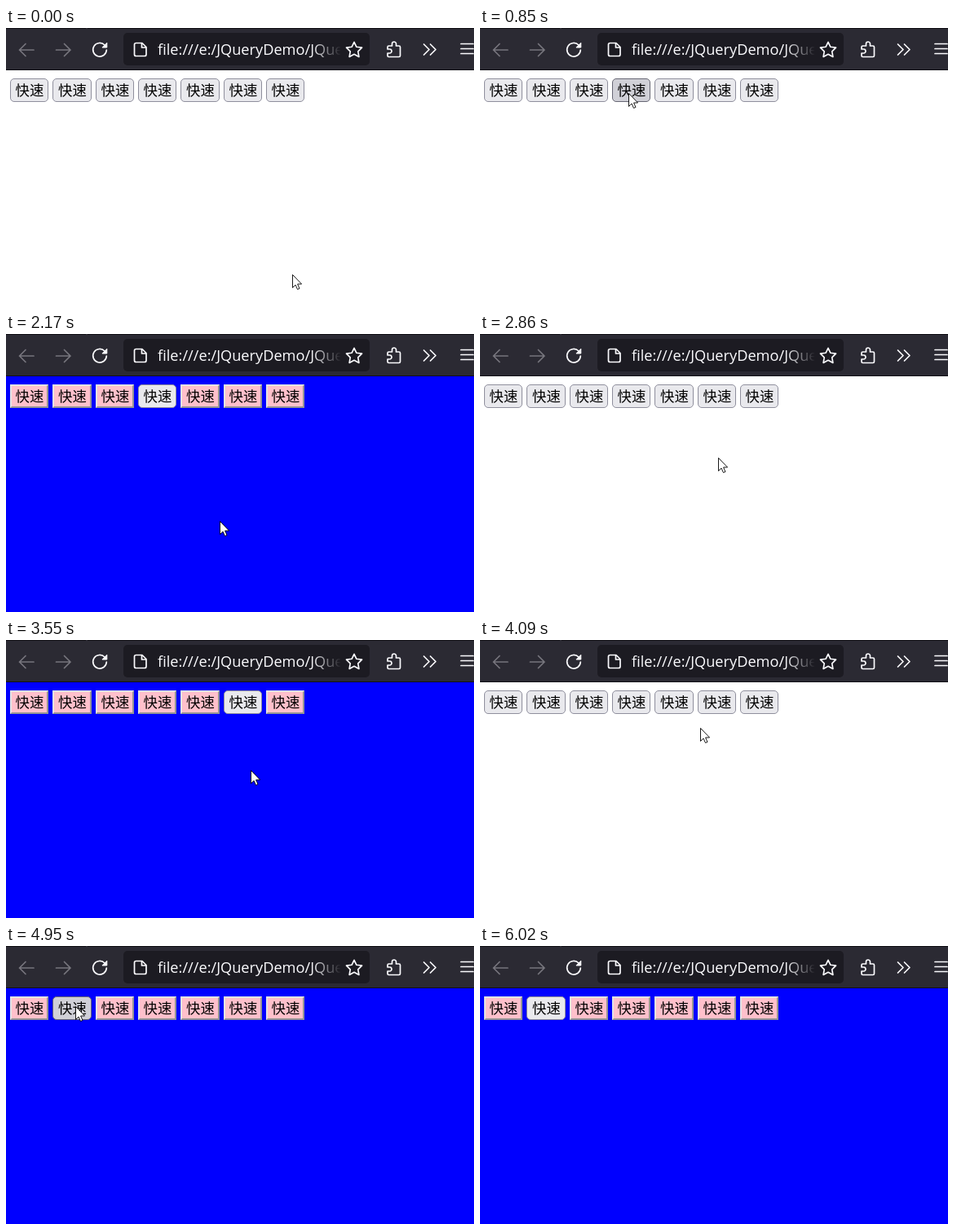
These frames come from a looping animation (574 px wide and 342 px high, 6730 ms). An HTML page:

```html
<!DOCTYPE html>
<html lang="zh">
<head>
<meta charset="utf-8">
<title>快速</title>
<style>
  html, body { margin: 0; width: 100%; height: 100%; overflow: hidden; background: #fff; }
  svg { display: block; width: 100%; height: 100%; }
  .icons { fill: none; stroke: #fbfbfe; stroke-width: 1.7; stroke-linecap: round; stroke-linejoin: round; }
  .dim { stroke: #77767e; }
  .url { font: 18.2px "Open Sans", "Noto Sans", sans-serif; fill: url(#fade); }
  .label { font: 17.4px "Noto Sans CJK SC", "Noto Sans CJK", sans-serif; text-anchor: middle; }
  .face { fill: #e9e9ed; stroke: #8f8f9d; }
  .hover .face { fill: #d0d0d7; stroke: #676774; }
  .active .face { fill: #b1b1b9; stroke: #484851; }
  .bevel, .pink .face { display: none; }
  .pink .bevel { display: inline; }
</style>
</head>
<body>
<svg viewBox="0 0 574 342">
  <defs>
    <linearGradient id="fade" gradientUnits="userSpaceOnUse" x1="374" y1="0" x2="411" y2="0">
      <stop stop-color="#fbfbfe"/>
      <stop offset="1" stop-color="#fbfbfe" stop-opacity="0"/>
    </linearGradient>
    <clipPath id="field"><path d="M180 6H410V46H180Z"/></clipPath>
  </defs>

  <rect id="page" width="574" height="342" fill="#fff"/>
  <g id="buttons"></g>

  <g id="toolbar">
    <path d="M0 0H574V52H0Z" fill="#2b2a33"/>
    <path d="M0 0H98V1H0ZM100 0H574V1H100ZM0 51H574V52H0Z" fill="#111016"/>
    <rect x="144" y="6" width="302" height="40" rx="5" fill="#1c1b22"/>
    <g clip-path="url(#field)"><text class="url" x="186" y="33">file:///e:/JQueryDemo/JQuery</text></g>
    <g class="icons">
      <path class="dim" d="M34 27H16.5M24 19.5L16.5 27L24 34.5"/>
      <path class="dim" d="M61.5 27H79M71.5 19.5L79 27L71.5 34.5"/>
      <g id="reload">
        <path d="M121 21A8.3 8.3 0 1 0 123.300 27"/>
        <path d="M123.800 18.500V24H118.300Z" fill="#fbfbfe" stroke-width="1"/>
      </g>
      <path d="M159.500 18.500H167L172 23.500V32.500Q172 34.500 170 34.500H159.500Q157.500 34.500 157.500 32.500V20.500Q157.500 18.500 159.500 18.500ZM166.500 18.500V24H172"/>
      <path id="star"/>
      <path d="M469.500 22H473.500V19.500A2.500 2.500 0 0 1 478.500 19.500V22H482Q483.500 22 483.500 23.500V34Q483.500 35.500 482 35.500H469.500Q468 35.500 468 34V31H470.500A2.500 2.500 0 0 0 470.500 26H468V23.500Q468 22 469.500 22Z"/>
      <path d="M512.500 20L519 26.500L512.500 33M520.500 20L527 26.500L520.500 33"/>
      <path d="M558 19.500H573M558 25.500H573M558 31.500H573"/>
    </g>
  </g>

  <path id="cursor" d="M.5 .5V16.500L4 13L6.500 18.500L9 17.500L6.600 12H11.600Z" fill="#fff" stroke="#000" stroke-width=".9"/>
</svg>

<script>
const LOOP = 6730, FRAMES = 87, LAG = 16;
const $ = id => document.getElementById(id);

const buttonLeft = i => Math.round(5 + 52.35 * i);
const buttonRight = i => Math.round(52.3 + 52.35 * i);
const aim = i => [37 + 48.35 * i, 71 + 3 * i];

const frames = [];
const state = { pos: [351, 303], pressed: null, chosen: null, loading: false, inside: true };

function hold(count) {
  for (; count > 0; count--) frames.push({ ...state });
}

function glide(count, to, via) {
  const from = state.pos;
  const bend = via || from.map((v, i) => (v + to[i]) / 2);
  for (let k = 1; k <= count; k++) {
    const r = (1 - k / count) ** 2, q = 1 - r;
    state.pos = from.map((v, i) => Math.round(r * r * v + 2 * q * r * bend[i] + q * q * to[i]));
    hold(1);
  }
}

function click(button) {
  state.pressed = button;
  hold(1);
  state.pressed = null;
  state.chosen = button;
  hold(1);
}

function reload() {
  state.chosen = null;
  state.loading = true;
  hold(1);
  state.loading = false;
}

hold(1);
glide(11, aim(3), [14, 150]);
hold(6);
click(3);
glide(2, [221, 246]);
hold(6);
glide(6, [283, 142], [303, 231]);
hold(2);
reload();

glide(1, [292, 152]);
glide(4, aim(5));
click(5);
glide(3, [300, 160]);
hold(2);
reload();

glide(4, [270, 108]);
glide(8, aim(1));
hold(1);
click(1);
glide(2, [135, 156]);
hold(3);
glide(8, [513, 334]);
state.inside = false;
hold(FRAMES - frames.length);

$('buttons').innerHTML = Array.from({ length: 7 }, (_, i) => {
  const w = buttonRight(i) - buttonLeft(i);
  return `
  <g transform="translate(${buttonLeft(i)} 62)">
    <rect class="face" x=".5" y=".5" width="${w - 1}" height="28" rx="4.5"/>
    <g class="bevel">
      <path d="M0 0H${w}V29H0Z" fill="#949494"/>
      <path d="M0 0H${w}L${w - 2} 2V27H2L0 29Z" fill="#e3e3e3"/>
      <path d="M2 2H${w - 2}V27H2Z" fill="#ffc0cb"/>
    </g>
    <text class="label" x="${w / 2 + 0.5}" y="21">快速</text>
  </g>`;
}).join('');
const buttons = [...$('buttons').children];

$('star').setAttribute('d', 'M' + Array.from({ length: 10 }, (_, i) => {
  const r = i % 2 ? 5 : 10, a = i * Math.PI / 5;
  return `${427 + r * Math.sin(a)} ${27.3 - r * Math.cos(a)}`;
}).join('L') + 'Z');

function draw({ pos: [x, y], pressed, chosen, loading, inside }) {
  $('page').setAttribute('fill', chosen === null ? '#fff' : '#00f');
  $('reload').setAttribute('class', loading ? 'dim' : '');
  $('cursor').setAttribute('transform', `translate(${x} ${y})`);
  $('cursor').setAttribute('visibility', inside ? 'visible' : 'hidden');

  buttons.forEach((button, i) => {
    const over = inside && x >= buttonLeft(i) && x < buttonRight(i) && y >= 62 && y < 91;
    const pink = chosen !== null && chosen !== i;
    button.setAttribute('class', pink ? 'pink' : pressed === i ? 'active' : over ? 'hover' : '');
  });
}

function tick() {
  const time = performance.now() % LOOP;
  draw(frames[Math.floor((time + LAG) / LOOP * FRAMES) % FRAMES]);
  requestAnimationFrame(tick);
}
tick();
</script>
</body>
</html>
```
